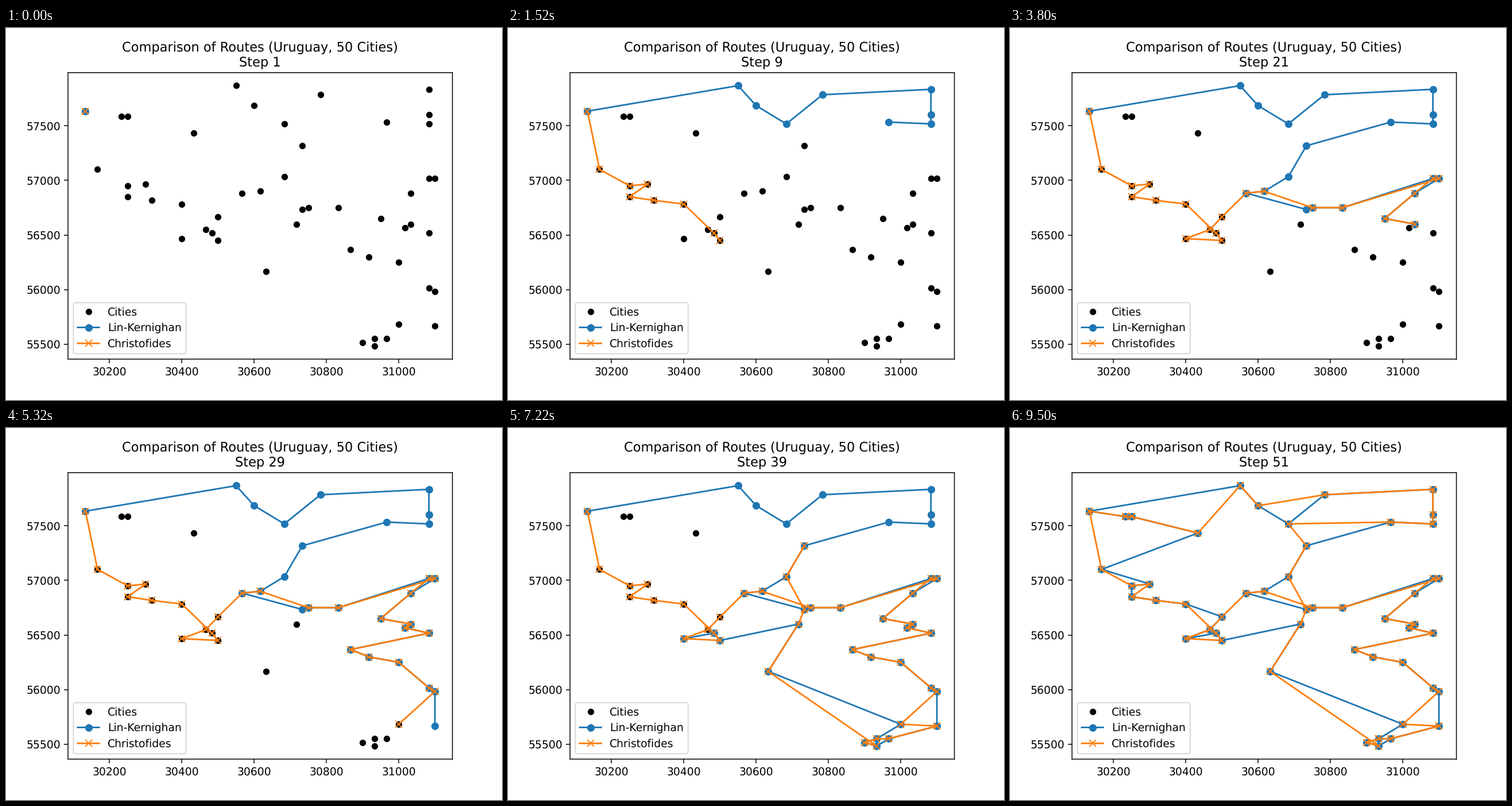
Write a matplotlib script that moves like this. It is 864 px wide and 648 px high and loops after 9.69 s.

```python
import matplotlib.pyplot as plt
import numpy as np
from matplotlib.animation import FuncAnimation

# Sub-pixel strokes and unhinted glyphs give smooth edges
plt.rcParams.update({"path.snap": False, "text.hinting": "no_hinting"})

# City positions lie on a grid of one sixtieth of 1000 units
GRID = 1000 / 60
LEFT, TOP = 1808, 3472

# Grid steps (right, down) from the top left corner, leg by leg
NORTH = [(0, 14), (25, 0), (28, 11), (33, 21), (39, 5), (57, 2), (57, 16),
         (57, 21), (50, 20), (36, 33), (33, 50)]
EAST = [(29, 58), (26, 59), (36, 68), (37, 67), (42, 67), (57, 51), (58, 51),
        (54, 59), (49, 73), (54, 76), (53, 78), (57, 81), (44, 90), (47, 94),
        (52, 97), (57, 111), (58, 113)]
SOUTH = [(58, 132), (50, 139), (48, 143), (46, 141), (48, 139), (52, 131),
         (30, 102), (35, 76)]
WEST = [(22, 85), (21, 81), (16, 84), (20, 79), (22, 72), (16, 65), (11, 63),
        (7, 61), (7, 55), (10, 54), (2, 46), (18, 26), (7, 17), (6, 17)]

right, down = np.array(NORTH + EAST + SOUTH + WEST).T
cities = np.column_stack([LEFT + right, TOP - down]) * GRID
count = len(cities)


def second_tour():
    """Visit the legs the other way round, with a few cities moved."""
    tour = [0, *range(46, 35, -1), *range(11, 36), *range(10, 0, -1),
            *range(47, count)]
    moves = [(45, 44), (38, 36), (39, 38), (40, 39), (11, 12), (13, 35),
             (16, 17), (33, 27), (31, 32), (30, 31), (3, 9)]
    for city, previous in moves:
        tour.remove(city)
        tour.insert(tour.index(previous) + 1, city)
    return tour


def closed(tour):
    return cities[[*tour, tour[0]]]


routes = [closed(range(count)), closed(second_tour())]

fig, ax = plt.subplots(figsize=(6.4, 4.8), dpi=135)
ax.plot(*cities.T, "ko", markersize=5, label="Cities")
lines = [
    ax.plot([], [], "o-", color="tab:blue", label="Lin-Kernighan")[0],
    ax.plot([], [], "x-", color="tab:orange", label="Christofides")[0],
]
ax.legend(loc="lower left")
title = ax.set_title("")


def update(i):
    for line, route in zip(lines, routes):
        line.set_data(*route[:i + 1].T)
    title.set_text(f"Comparison of Routes (Uruguay, {count} Cities)\nStep {i + 1}")
    return [*lines, title]


anim = FuncAnimation(fig, update, frames=count + 1, interval=190,
                     repeat=True, repeat_delay=0)
plt.show()
```
